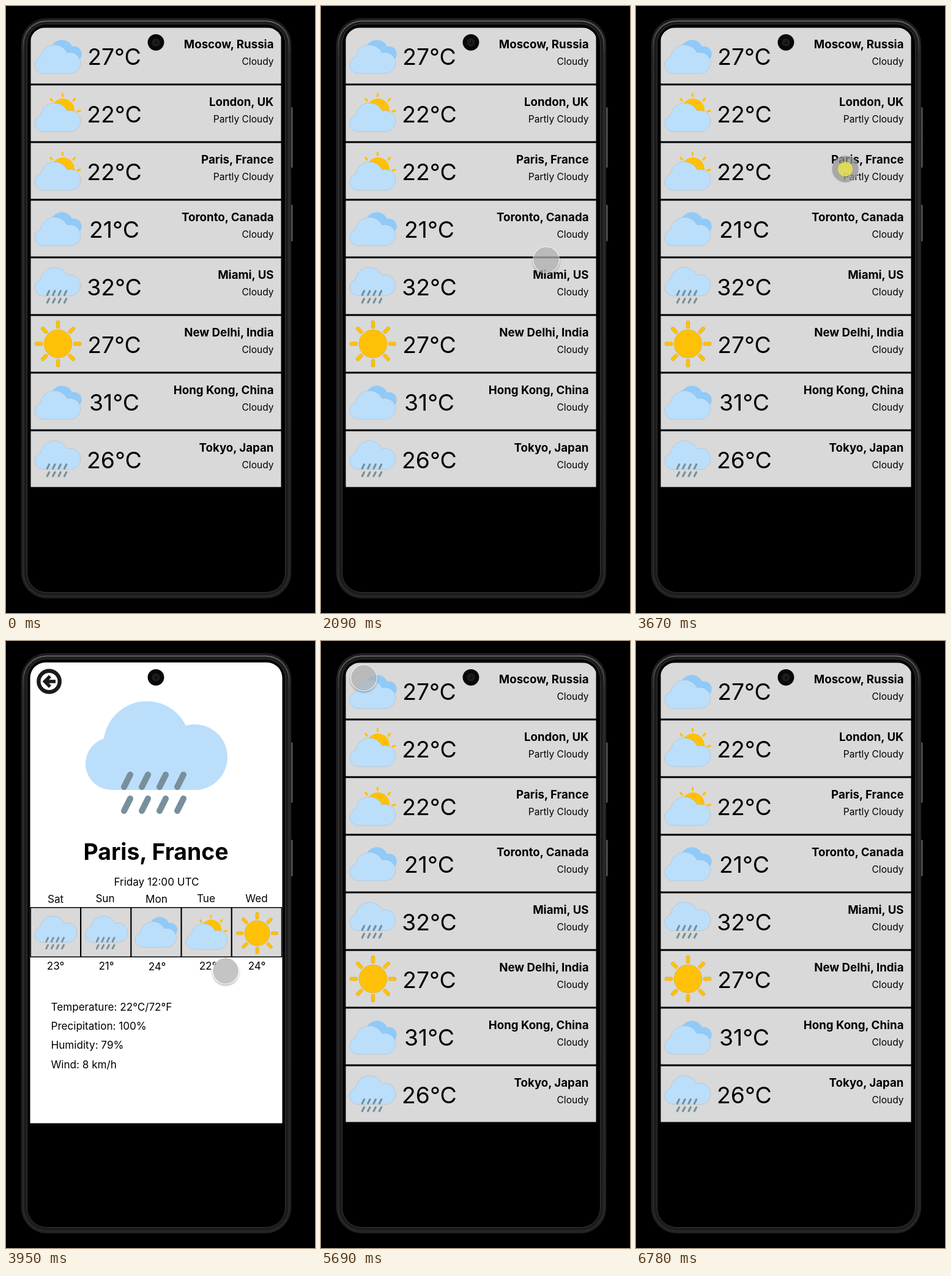
These frames come from a looping animation (505x990 px, 7.19 s). An HTML page:

```html
<!DOCTYPE html>
<html lang="en">
<head>
<meta charset="utf-8">
<title>Weather prototype</title>
<style>
  html, body { margin: 0; width: 100%; height: 100%; overflow: hidden; background: #000; }
  svg { position: absolute; left: 0; top: 0; display: block; overflow: visible; }
  text { font-family: Inter, sans-serif; font-optical-sizing: none; }
  .bold { font-weight: 700; }
  .mid { text-anchor: middle; }
  .end { text-anchor: end; }

  #list, #detail, #cursor, #touch, #hand, #dot { animation: 7190ms step-end infinite; }
  #list { animation-name: list; }
  #detail { animation-name: detail; }
  @keyframes list {
    0%, 78.136% { visibility: visible; }
    51.989% { visibility: hidden; }
  }
  @keyframes detail {
    0%, 78.136% { visibility: hidden; }
    51.989% { visibility: visible; }
  }

  #cursor { position: absolute; left: 0; top: 0; animation-name: move, show; }
  #cursor > * { position: absolute; }
  #touch {
    left: -22px; top: -22px; width: 44px; height: 44px; box-sizing: border-box;
    border: 1px solid #fff; border-radius: 50%; background-clip: padding-box;
    animation-name: touch;
  }
  #dot {
    left: -12px; top: -12px; width: 24px; height: 24px; border-radius: 50%;
    background: rgba(245, 240, 60, .7); animation-name: dot;
  }
  #hand { animation-name: hand; }

  @keyframes show {
    0%, 94.26% { opacity: 0; }
    8.06% { opacity: 1; }
  }
  @keyframes touch {
    0%, 41.558%, 51.989%, 79.11% {
      opacity: 1; background-color: rgba(176, 176, 176, .74);
      border-color: rgba(255, 255, 255, .8); box-shadow: 0 2px 3px rgba(0, 0, 0, .3);
    }
    34.743% { opacity: 0; }
    51.015%, 77.163% {
      opacity: 1; background-color: rgba(150, 150, 150, .74);
      border-color: #aaa; box-shadow: none;
    }
  }
  @keyframes dot {
    0%, 41.558%, 51.989%, 79.11% { opacity: 0; }
    34.743%, 51.015%, 77.163% { opacity: 1; }
  }
  @keyframes hand {
    0%, 41.558% { opacity: 0; }
    34.743% { opacity: 1; }
  }
  @keyframes move {
    0% { transform: translate(460px, 1010px); }
    8.06% { transform: translate(460px, 1010px); animation-timing-function: steps(4, start); }
    11.78% { transform: translate(323px, 878px); }
    13.62% { transform: translate(323px, 878px); animation-timing-function: steps(5, start); }
    18.414% { transform: translate(326px, 838px); animation-timing-function: steps(4, start); }
    22.197% { transform: translate(337px, 716px); animation-timing-function: steps(2, start); }
    24.145% { transform: translate(354px, 609px); animation-timing-function: steps(6, start); }
    30.042% { transform: translate(368px, 414px); animation-timing-function: steps(4, start); }
    33.936% { transform: translate(368px, 442px); }
    34.743% { transform: translate(368px, 442px); animation-timing-function: steps(6, start); }
    40.584% { transform: translate(358px, 370px); animation-timing-function: steps(2, start); }
    42.531% { transform: translate(356px, 344px); }
    45.174% { transform: translate(356px, 344px); animation-timing-function: steps(6, start); }
    51.015% { transform: translate(342px, 266px); }
    52.962% { transform: translate(342px, 266px); animation-timing-function: steps(3, start); }
    55.883% { transform: translate(359px, 538px); }
    60.473% { transform: translate(359px, 538px); animation-timing-function: steps(2, start); }
    62.337% { transform: translate(330px, 440px); animation-timing-function: steps(4, start); }
    66.092% { transform: translate(135px, 135px); animation-timing-function: steps(3, start); }
    68.915% { transform: translate(94px, 94px); animation-timing-function: steps(2, start); }
    70.765% { transform: translate(78px, 70px); animation-timing-function: steps(2, start); }
    72.601% { transform: translate(70px, 60px); }
    80.083% { transform: translate(70px, 60px); animation-timing-function: steps(8, start); }
    87.733% { transform: translate(472px, 498px); animation-timing-function: steps(3, start); }
    90.515% { transform: translate(476px, 640px); animation-timing-function: steps(4, start); }
    94.27%, 100% { transform: translate(461px, 953px); }
  }
</style>
</head>
<body>
<svg width="505" height="990" viewBox="0 0 505 990">
  <defs>
    <linearGradient id="rim" x2="0" y2="1">
      <stop offset="0" stop-color="#626262"/>
      <stop offset=".06" stop-color="#333"/>
      <stop offset="1" stop-color="#2c2c2c"/>
    </linearGradient>
    <linearGradient id="key" x2="1" y2="0">
      <stop offset="0" stop-color="#222"/>
      <stop offset="1" stop-color="#666"/>
    </linearGradient>
    <clipPath id="screen"><rect x="39.5" y="35" width="412" height="922" rx="25"/></clipPath>

    <!-- Icons: 75 units wide, origin at top left -->
    <path id="cloud" fill="#bbdefb" vector-effect="non-scaling-stroke"
      transform="scale(.323) translate(-130 -98)"
      d="M173 243A43 43 0 0 1 160 159A71 71 0 0 1 294 138A53.5 53.5 0 1 1 309 243Z"/>
    <g id="rain">
      <use href="#cloud"/>
      <path fill="none" stroke="#78909c" stroke-opacity="1" stroke-width="10" stroke-linecap="round"
        transform="scale(.323) translate(-130 -98)"
        d="M203 218l-10 20m39-20l-10 20m39-20l-10 20m39-20l-10 20M203 257l-10 20m39-20l-10 20m39-20l-10 20m39-20l-10 20"/>
    </g>
    <g id="cloudy">
      <path fill="#90caf9" stroke="none" transform="translate(-47 -54)"
        d="M73 77A18.5 18.5 0 0 1 108 66A12.7 12.7 0 1 1 110 91Z"/>
      <use href="#cloud" y="9.3"/>
    </g>
    <g id="partly">
      <circle cx="46" cy="28" r="19" fill="#ffc107" stroke="none"/>
      <path fill="none" stroke="#ffc107" stroke-opacity="1" stroke-width="3.4" stroke-linecap="round"
        d="M45.5 1.8V5M26 9.5l2.2 3M65.5 9.5l-2.2 3M70 30l4-.8"/>
      <use href="#cloud" y="16"/>
    </g>
    <g id="sun" fill="#ffc107"></g>
  </defs>

  <g id="phone">
    <rect x="464" y="165" width="4.5" height="99" rx="2" fill="url(#key)"/>
    <rect x="464" y="324" width="4.5" height="60" rx="2" fill="url(#key)"/>
    <rect x="25.5" y="20.5" width="440" height="945" rx="41" fill="#1b1b1b" stroke="#2a2a2a"/>
    <rect x="28.5" y="24.5" width="434" height="938" rx="38" fill="none" stroke="url(#rim)" stroke-width="2"/>
    <rect x="34.5" y="29.5" width="422" height="927" rx="32" fill="#000" stroke="#363636"/>
  </g>

  <g clip-path="url(#screen)">
    <g id="list"></g>
    <g id="detail">
      <rect x="39" y="35" width="413" height="751.5" fill="#fff"/>
      <g fill="none" stroke="#1a1a1a">
        <circle cx="70.5" cy="66" r="17.2" stroke-width="6.4"/>
        <path stroke-width="5.4" d="M81 66H64M72 57.5L63.5 66L72 74.5"/>
      </g>
      <use href="#rain" transform="translate(130 98) scale(3.096)"/>
      <rect x="39" y="434" width="413" height="82" fill="#000"/>
    </g>
  </g>

  <circle cx="245" cy="59.3" r="13.4" fill="#080808"/>
  <circle cx="245" cy="59.3" r="6.5" fill="#1e1e1e"/>
  <circle cx="245" cy="59.3" r="3" fill="#0e0e0e"/>
  <circle cx="244" cy="58.3" r="1" fill="#3a3a3a"/>
</svg>

<div id="cursor">
  <div id="touch"></div>
  <div id="dot"></div>
  <svg id="hand" width="1" height="1">
    <path fill="#fff" stroke="#111" stroke-linejoin="round"
      d="M-1 13V2.5a1.8 1.8 0 0 1 3.6 0V9a1.7 1.7 0 0 1 3.3.3a1.6 1.6 0 0 1 3 .5a1.5 1.5 0 0 1 2.6 1V16c0 3-1.6 4-1.8 7.5H0C-.5 20-4 18-6 13.6c-.8-2 1.2-3 2.6-1.6L-1 14.5Z"/>
    <path stroke="#111" d="M2.6 9v4M5.9 9.5v4M8.9 10.5v3"/>
  </svg>
</div>

<script>
  // Type sizes of the design, enlarged to the stage
  const ZOOM = 14 / 9;
  const LARGE = 24 * ZOOM, CITY = 12 * ZOOM, BODY = 11 * ZOOM, SMALL = 10 * ZOOM;

  const $ = id => document.getElementById(id);
  const add = (id, markup) => $(id).insertAdjacentHTML('beforeend', markup);
  const text = (str, x, y, size, cls = '') =>
    `<text class="${cls}" x="${x}" y="${y}" font-size="${size}">${str}</text>`;
  const tile = (x, y, w, h) => `<rect x="${x}" y="${y}" width="${w}" height="${h}" fill="#d9d9d9"/>`;
  const icon = (name, x, y, scale = 1) =>
    `<use href="#${name}" stroke="#4a4038" stroke-opacity=".25" stroke-width=".5"
      transform="translate(${x} ${y}) scale(${scale})"/>`;

  const rays = Array.from({ length: 8 }, (_, i) =>
    `<rect x="35" y="0" width="6" height="13" rx="2.8" transform="rotate(${i * 45} 38 38)"/>`);
  add('sun', '<circle cx="38" cy="38" r="23"/>' + rays.join(''));

  // city, temperature, condition, icon, icon top
  const cities = [
    ['Moscow, Russia', 27, 'Cloudy', 'cloudy', 54],
    ['London, UK', 22, 'Partly Cloudy', 'partly', 142],
    ['Paris, France', 22, 'Partly Cloudy', 'partly', 238],
    ['Toronto, Canada', 21, 'Cloudy', 'cloudy', 335],
    ['Miami, US', 32, 'Cloudy', 'rain', 426],
    ['New Delhi, India', 27, 'Cloudy', 'sun', 513],
    ['Hong Kong, China', 31, 'Cloudy', 'cloudy', 618],
    ['Tokyo, Japan', 26, 'Cloudy', 'rain', 709]
  ];
  cities.forEach(([city, deg, sky, name, top], i) => {
    const y = 94 * i;
    add('list', tile(40.5, y + 35.5, 409, 91) + icon(name, 47, top) +
      text(deg + '°C', 177, y + 96, LARGE, 'mid') +
      text(city, 437.5, y + 68.7, CITY, 'bold end') +
      text(sky, 437.5, y + 96, SMALL, 'end'));
  });

  // day, x, y, temperature, x, y, icon, x, y, scale
  const days = [
    ['Sat', 81, 427, 23, 81, 535.5, 'rain', 47, 448.5, .92],
    ['Sun', 162, 425.5, 21, 164, 535.5, 'rain', 129.5, 448.5, .92],
    ['Mon', 246, 427, 24, 247, 537, 'cloudy', 211, 449, .9],
    ['Tue', 327, 425.5, 22, 330, 535.5, 'partly', 294, 446.5, .9],
    ['Wed', 409.5, 425.5, 24, 410, 535.5, 'sun', 376.3, 442.3, .9]
  ];
  days.forEach(([day, dx, dy, deg, tx, ty, name, x, y, scale], i) => {
    add('detail', tile(41 + 82.2 * i, 435.5, 80, 79) + icon(name, x, y, scale) +
      text(day, dx, dy, BODY, 'mid') + text(deg + '°', tx, ty, BODY, 'mid'));
  });

  add('detail', text('Paris, France', 245, 356.5, LARGE, 'bold mid') +
    text('Friday 12:00 UTC', 246, 399, BODY, 'mid'));
  ['Temperature: 22°C/72°F', 'Precipitation: 100%', 'Humidity: 79%', 'Wind: 8 km/h']
    .forEach((line, i) => add('detail', text(line, 73.5, 602.5 + 31.4 * i, BODY)));
</script>
</body>
</html>
```
